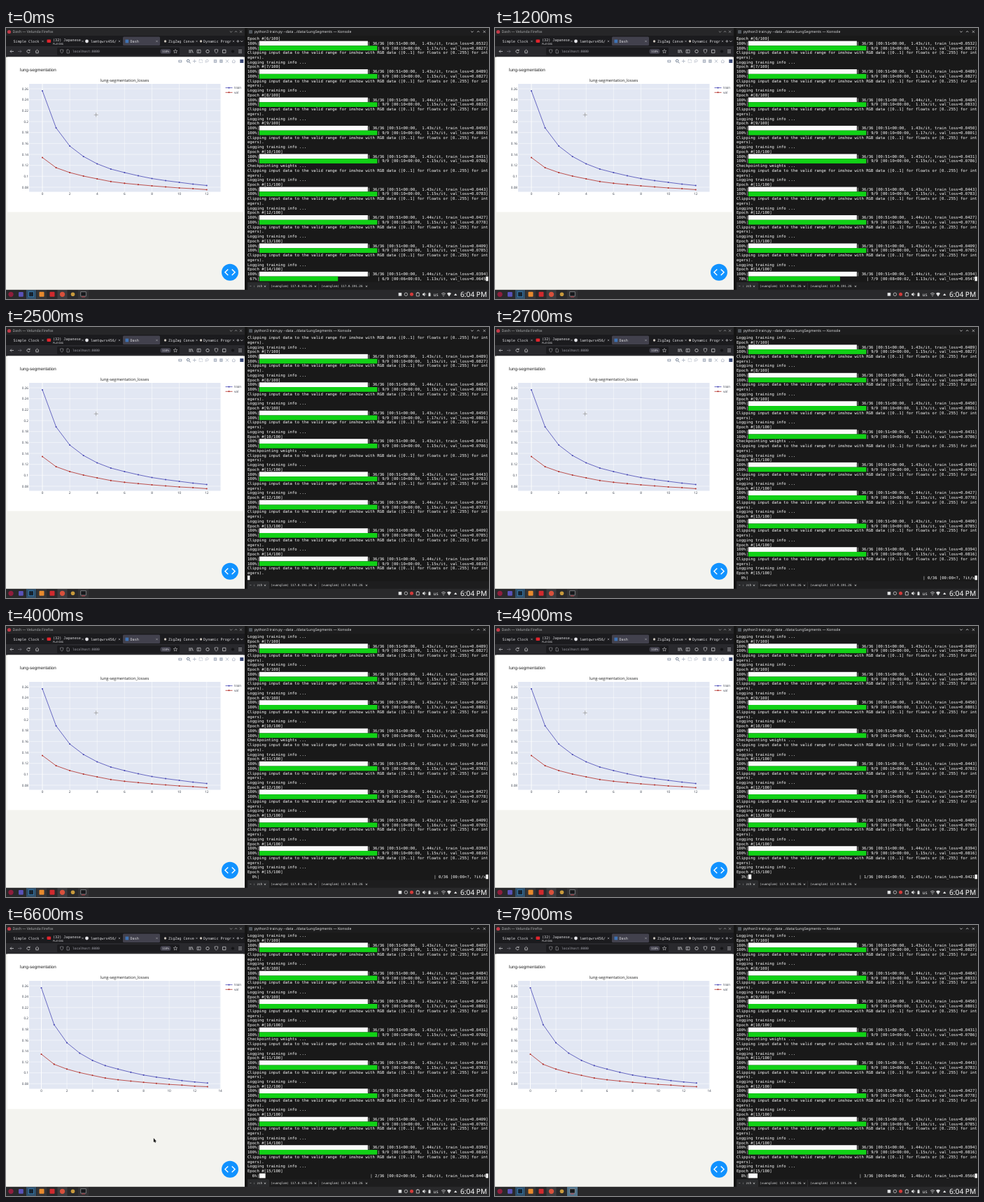
An HTML page for the animation above (8 s loop, 690 by 388 pixels).

```html
<!DOCTYPE html>
<html lang="en">
<head>
<meta charset="utf-8">
<title>Training dashboard</title>
<style>
html, body { margin: 0; width: 100%; height: 100%; overflow: hidden; background: #191919; }
svg { display: block; width: 100%; height: 100%; }
text { text-rendering: geometricPrecision; white-space: pre; }
.mono { font-family: "DejaVu Sans Mono", monospace; }
.ui { font-family: "Noto Sans", sans-serif; }
.plot { font-family: "Open Sans", sans-serif; }
.page { font-family: "Liberation Sans", sans-serif; }
</style>
</head>
<body>
<svg id="stage" viewBox="0 0 690 388">
  <g id="browser"></g>
  <g id="modebar"></g>
  <g id="chart"></g>
  <g id="konsole"></g>
  <g id="term"></g>
  <g id="bar"></g>
  <g id="cross" fill="none">
    <path d="M-3.5 0H3.5M0 -3.5V3.5" stroke="#fff" stroke-width="1.6"/>
    <path d="M-3.2 0H3.2M0 -3.2V3.2" stroke="#8a8d96" stroke-width=".8"/>
  </g>
  <path id="arrow" d="M0 0V5.2L1.2 4.2L2 6L2.9 5.6L2.1 3.9H3.6Z" fill="#111" stroke="#111" stroke-width=".3"/>
</svg>
<script>
const $ = id => document.getElementById(id);
const LOOP = 8000;

const rect = (x, y, w, h, fill, extra = '') =>
  `<rect x="${x}" y="${y}" width="${w}" height="${h}" fill="${fill}" ${extra}/>`;
const dot = (x, y, r, fill) => `<circle cx="${x}" cy="${y}" r="${r}" fill="${fill}"/>`;
const ring = (x, y, r, color, w = 0.7) =>
  `<circle cx="${x}" cy="${y}" r="${r}" fill="none" stroke="${color}" stroke-width="${w}"/>`;
const line = (d, color, w = 0.7) =>
  `<path d="${d}" fill="none" stroke="${color}" stroke-width="${w}"/>`;
const esc = s => s.replace(/&/g, '&amp;').replace(/</g, '&lt;');
const text = (x, y, s, size, fill, cls, extra = '') =>
  `<text class="${cls}" x="${x}" y="${y}" font-size="${size}" fill="${fill}" ${extra}>${esc(s)}</text>`;
const cross = (x, y, r, color) =>
  line(`M${x - r} ${y - r}l${2 * r} ${2 * r}M${x - r} ${y + r}l${2 * r} ${-2 * r}`, color, 0.6);
const chevron = (x, y, dir, color) =>
  line(`M${x - 1.7} ${y - dir * 0.8}l1.7 ${dir * 1.7}l1.7 ${-dir * 1.7}`, color, 0.7);

function windowButtons(x, gap, color) {
  return chevron(x, 5.3, 1, color) + chevron(x + gap, 5.3, -1, color) + cross(x + 2 * gap, 5.3, 1.6, color);
}

// ---- Browser ----
function browser(updating) {
  const ink = '#dcdcdf', dim = '#a4a4aa';
  let s = rect(0, 0, 341, 11, '#262628') + rect(0, 11, 341, 15, '#1b1b1e') + rect(0, 26, 341, 15.5, '#29292d');
  s += dot(4.5, 5.5, 2.6, '#c03a48');
  s += text(9.5, 7.4, updating ? 'Updating...' : 'Dash — Velunda Firefox', 5.2, '#a9abad', 'ui');
  s += windowButtons(321.5, 7, '#a9abad');

  s += rect(167, 12.5, 53, 12.5, '#42414d', 'rx="1.5"');
  const tab = (x, label, y = 20.8) => text(x, y, label, 5.1, ink, 'mono');
  s += tab(10.5, 'Simple Clock');
  s += rect(58.5, 16.4, 5.6, 4.6, '#e0242c', 'rx="1"') + tab(67, '(32) Japanese', 19.4) + text(67, 24, 'PLAYING', 3.5, ink, 'mono');
  s += dot(115.5, 19, 2.4, '#e6e6ea') + tab(121, 'lamtqwrx456/');
  s += rect(170.5, 16.6, 4.6, 4.8, '#3f73b5') + tab(177.5, updating ? 'Updating...' : 'Dash');
  s += dot(227.5, 19, 1.7, '#c9c3ba') + tab(232, 'ZigZag Conve');
  s += dot(278.5, 19, 1.7, '#c9c3ba') + tab(282, 'Dynamic Progr');
  for (const x of [52.5, 109.5, 162, 215.5, 272.5, 325]) s += cross(x, 19, 1.2, dim);
  s += line('M329.3 19h4M331.3 17v4', ink, 0.6) + chevron(336.8, 19, 1, ink);

  s += line('M11 33.5H6M8 31.5l-2 2l2 2', ink) + line('M17 33.5h5M20 31.5l2 2l-2 2', '#77767f');
  s += line('M33.8 32.1a2.2 2.2 0 1 0 .4 2M34.1 30.6v1.8h-1.8', ink);
  s += line('M42 33.5l2.5 -2.3l2.5 2.3M42.8 33v2.8h3.4v-2.8', ink);
  s += rect(73, 28, 175, 11, '#1b1b1e', 'rx="1.5"');
  s += line('M77.5 31.2q1.8 0 2.2 -.5q.4 .5 2.2 .5q0 3.8 -2.2 5q-2.2 -1.2 -2.2 -5z', dim, 0.6);
  s += line('M87 31v5h3.4v-3.8l-1.2 -1.2z', dim, 0.6);
  s += text(95, 35.2, 'localhost:8080', 4.6, '#a9a9b2', 'mono');
  s += rect(220.5, 30, 15, 7, '#42414d', 'rx="3"') + text(228, 35, '110%', 4.2, ink, 'mono', 'text-anchor="middle"');
  s += line('M242 30.6l.8 1.9l2 .1l-1.5 1.3l.5 2l-1.8 -1.1l-1.8 1.1l.5 -2l-1.5 -1.3l2 -.1z', ink, 0.5);
  s += line('M262 31v4.8M264 31v4.8M265.6 31.1l1.6 4.7', ink, 0.8);
  s += line('M273 31.3h5v4.4h-5zM275 31.3v4.4', ink, 0.6);
  s += ring(288, 33.5, 2.2, ink) + line('M298 31q2 0 2.4 -.5q.4 .5 2.4 .5q0 4 -2.4 5.2q-2.4 -1.2 -2.4 -5.2z', ink, 0.6);
  s += line('M309.5 31.3h4.4v4.4h-4.4z', ink, 0.7) + dot(324, 33.5, 2.1, '#141416');
  s += line('M332 31.5h5M332 33.5h5M332 35.5h5', ink, 0.6);

  s += rect(0, 41.5, 341, 333.5, '#f3f3ef') + rect(2, 41.5, 337, 222, '#fff');
  s += text(20, 61.8, 'lung-segmentation', 6.3, '#222', 'page');
  s += dot(320, 349.7, 12, '#1192ff');
  s += line('M317.3 345.5l-4.4 4.3l4.4 4.3M322.7 345.5l4.4 4.3l-4.4 4.3', '#fff', 1.4);
  return s + rect(341, 0, 4, 375, '#141414');
}

function modebar() {
  const g = '#a9b1bf';
  let s = rect(246.3, 45.8, 5, 3.6, g, 'rx=".6"') + dot(248.8, 47.6, 1, '#fff');
  s += line('M262 49l1.4 1.4', '#4d5d77', 0.9) + ring(260.2, 47, 1.8, '#4d5d77', 0.8);
  s += line('M266.8 47.5h5M269.3 45v5', g, 0.8);
  s += `<rect x="276" y="45.4" width="4.4" height="4.2" fill="none" stroke="${g}" stroke-width=".7" stroke-dasharray="1 .6"/>`;
  s += line('M285 49.8q.2 -1 .6 -1.2q-1.7 -1.5 .6 -2.8q2.5 -.9 3.3 .9q0 1.9 -3.8 1.9', g);
  for (const x of [296.8, 305.2]) s += rect(x, 45.3, 4.4, 4.4, g);
  s += line('M297.8 47.5h2.4M299 46.3v2.4M306.2 47.5h2.4', '#fff', 0.6);
  s += line('M314 45.3l4 4.4M318 45.3l-4 4.4', g, 0.8);
  s += line('M322.8 47.7l2.5 -2.2l2.5 2.2M323.6 47.2v2.5h3.4v-2.5', g);
  return s + rect(334.3, 45, 5, 5, '#3c4a78');
}

// ---- Chart ----
const TRAIN = [.2562, .1885, .1553, .1362, .1228, .1132, .1068, .101, .0959, .0921, .0889, .0857, .0832, .0812];
const VAL = [.1343, .1157, .1068, .1004, .0953, .0904, .0872, .0848, .0825, .0806, .0787, .0774, .0755, .0745];

function chart(n) {
  const blue = '#4747b4', red = '#b32e28', ink = '#333a48';
  const x0 = n > 13 ? 50.5 : 52, step = n > 13 ? 18.26 : 19.56;
  const px = i => x0 + i * step;
  const scale = 141.5 / (TRAIN[0] - VAL[n - 1]);
  const py = v => 90 + (TRAIN[0] - v) * scale;
  let s = rect(33, 80, 273.5, 154.5, '#e2e7f3');
  for (let i = 0; i <= n; i += 2) {
    const x = px(i);
    if (x > 307) break;
    s += line(`M${x} 80V234.5`, '#fff', i ? 0.5 : 0.9);
    s += text(x, 239.2, String(i), 4.7, ink, 'plot', 'text-anchor="middle"');
  }
  for (let k = 4; k <= 13; k++) {
    const v = k / 50, y = py(v);
    s += line(`M33 ${y}H306.5`, '#fff', 0.5);
    s += text(32, y + 1.7, String(v), 4.7, ink, 'plot', 'text-anchor="end"');
  }
  for (const [data, color] of [[TRAIN, blue], [VAL, red]]) {
    const pts = data.slice(0, n).map((v, i) => [px(i), py(v)]);
    s += `<polyline points="${pts.join(' ')}" fill="none" stroke="${color}" stroke-width=".8"/>`;
    s += pts.map(p => dot(p[0], p[1], 1.05, color)).join('');
  }
  s += text(169.5, 77.4, 'lung-segmentation_losses', 5.75, '#222', 'plot', 'text-anchor="middle"');
  [['train', blue, 85.6], ['val', red, 92.3]].forEach(([name, color, y]) => {
    s += line(`M313.5 ${y}h10`, color, 0.8) + dot(318.5, y, 1.05, color);
    s += text(326, y + 1.6, name, 4.7, ink, 'plot');
  });
  return s;
}

// ---- Terminal ----
const COLS = 102, ROWS = 52, CW = 3.371, RH = 6.74, TX = 345, TY = 11.9;
const WHITE = '#fcfcfc', GREEN = '#11d116', SHELL = '#191919';

const progress = (done, total, tail, color) => ({ done, total, tail, color });
const trainBar = (done, time, rate, loss) =>
  progress(done, 36, `| ${done}/36 [${time},  ${rate}s/it, train_loss=${loss}]`, WHITE);
const valBar = (done, time, rate, loss) =>
  progress(done, 9, `| ${done}/9 [${time},  ${rate}s/it, val_loss=${loss}]`, GREEN);

// epoch, train rate, train loss, val rate, val loss
const HISTORY = [
  [6, '1.43', '0.0532', '1.17', '0.0827'],
  [7, '1.43', '0.0489', '1.15', '0.0827'],
  [8, '1.44', '0.0484', '1.15', '0.0833'],
  [9, '1.43', '0.0450', '1.17', '0.0801'],
  [10, '1.43', '0.0431', '1.15', '0.0786'],
  [11, '1.43', '0.0443', '1.15', '0.0783'],
  [12, '1.44', '0.0427', '1.15', '0.0778'],
  [13, '1.43', '0.0409', '1.16', '0.0785'],
  [14, '1.44', '0.0394', '1.15', '0.0816']
];
const LOG = [];
for (const [n, tr, tl, vr, vl] of HISTORY) {
  LOG.push(`Epoch #[${n}/100]`, trainBar(36, '00:51<00:00', tr, tl), valBar(9, '00:10<00:00', vr, vl));
  if (n === 10) LOG.push('Checkpointing weights ...');
  LOG.push('Clipping input data to the valid range for imshow with RGB data ([0..1] for floats or [0..255] for int',
    'egers).', 'Logging training info ...');
}
LOG.push('Epoch #[15/100]');

// start time, finished log lines, live last line
const STEPS = [
  [0, 51, valBar(6, '00:06<00:03', '1.13', '0.0645')],
  [200, 51, valBar(7, '00:08<00:02', '1.13', '0.0547')],
  [1300, 51, valBar(8, '00:09<00:01', '1.14', '0.0683')],
  [2400, 54, ''],
  [2700, 56, progress(0, 36, '| 0/36 [00:00<?, ?it/s]', WHITE)],
  [4150, 56, trainBar(1, '00:01<00:50', '1.45', '0.0421')],
  [5600, 56, trainBar(2, '00:02<00:50', '1.48', '0.0444')],
  [7050, 56, trainBar(3, '00:04<00:48', '1.46', '0.0566')]
];

function row(item, i, live) {
  const top = TY + i * RH, base = top + 5.15;
  const put = (col, s) => text(TX + col * CW, base, s, 5.6, '#fff', 'mono');
  const block = col => rect(TX + col * CW, top + 0.2, CW, RH - 0.3, WHITE);
  if (typeof item === 'string') return put(0, item) + (live ? block(0) : '');
  const { done, total, tail, color } = item;
  const start = COLS - tail.length, frac = done / total;
  const head = String(Math.round(frac * 100)).padStart(3) + '%|';
  let s = put(0, head) + put(start, live ? tail.slice(0, -1) : tail);
  if (done) s += rect(TX + 5 * CW, top, (start - 5) * CW * frac, RH, color);
  return s + (live ? block(COLS - 1) : '');
}

function terminal([, count, last]) {
  const lines = LOG.slice(count - ROWS + 1, count);
  return lines.map((l, i) => row(l, i, false)).join('') + row(last, ROWS - 1, true);
}

function konsole() {
  const ink = '#dedfe0';
  let s = rect(345, 0, 345, 11, '#1d1d1e') + rect(345, 11, 345, 353, SHELL) + rect(345, 364, 345, 11, '#1d1d1e');
  s += rect(347, 3, 5, 5, '#50565c', 'rx=".8"') + text(355, 7.4, 'python3 train.py --data ../data/LungSegments — Konsole', 5.2, ink, 'ui');
  s += windowButtons(666, 8.7, '#f2f2f2');
  s += rect(345, 364, 30, 11, '#2a2b2d');
  s += text(348, 371.4, '~ : zsh', 4.35, ink, 'mono');
  for (const x of [378, 450]) s += text(x, 371.4, '(vuonglam) 117.0.191.26', 4.3, ink, 'mono');
  for (const x of [370, 442, 515]) s += cross(x, 369.8, 1.2, ink);
  return s + line('M375.5 365v10M446.5 365v10', '#3a3a3c', 0.6);
}

// ---- Task bar ----
function taskbar(hover) {
  const c = '#e2e3e4';
  let s = rect(0, 374.8, 690, 13.2, '#29292b');
  s += rect(29, 375, 14, 13, '#31506a') + rect(44, 375, 14, 13, '#343436') + rect(73.5, 375, 14, 13, '#3c3c3f');
  s += rect(103, 375, 15, 13, hover ? '#51748c' : '#323234');
  s += dot(7, 381.3, 3.6, '#8f1e3c') + rect(18, 378, 6.8, 6.8, '#5a52b8', 'rx="1"');
  s += rect(32.5, 377.8, 7, 7, '#16222e', 'stroke="#3c9be0" stroke-width=".6"') + rect(47.5, 377.7, 7, 7, '#e88a2e', 'rx="1"');
  s += rect(62.5, 377.8, 7, 7, '#d02a2e', 'rx="1"') + dot(80.5, 381.3, 3.6, '#d8503c') + dot(95.5, 381.3, 2.8, '#c89a3c');
  s += rect(106.8, 377.8, 7.4, 6.2, '#17191c', 'stroke="#a9adb1" stroke-width=".6"') + rect(108, 384.5, 5, 0.9, '#c8404a');
  s += rect(560.7, 379.1, 4.5, 4.5, c) + ring(571.4, 381.3, 2.2, c);
  s += dot(579.5, 381.3, 2.5, '#d23a3a');
  s += line('M586.3 379.3h4v4.6h-4zM587.4 378.6h1.8', c);
  s += `<path d="M595 380.3h1.3l1.9 -1.7v5.6l-1.9 -1.7h-1.3z" fill="${c}"/>` + line('M599.2 380q1 1.4 0 2.7', c, 0.6);
  s += rect(603.5, 379.6, 3, 4.5, c) + rect(604.3, 378.7, 1.4, 1, c);
  s += text(610.5, 383.5, 'us', 6.4, c, 'ui');
  s += line('M622 380.5q3 -2.6 6 0M623.2 382q1.8 -1.5 3.6 0', c) + dot(625, 383.6, 0.7, c);
  s += `<path d="M630 380q3 -2.6 6 0l-3 4.4z" fill="${c}"/><path d="M640 383l2.2 -3l2.2 3z" fill="${c}"/>`;
  return s + text(649, 385, '6:04 PM', 10.2, '#fff', 'ui');
}

// ---- Timeline ----
// time, pointer x, pointer y
const PATH = [
  [5400, 128.7, 124.3], [5700, 152.3, 141.6], [6500, 211, 305.5], [6750, 211, 305.5], [7450, 110, 381]
];
const ease = u => u * u * (3 - 2 * u);
function pointer(t) {
  const k = PATH.findIndex(p => t < p[0]);
  if (k === 0) return PATH[0].slice(1);
  if (k < 0) return PATH[PATH.length - 1].slice(1);
  const [t0, x0, y0] = PATH[k - 1], [t1, x1, y1] = PATH[k];
  const u = ease((t - t0) / (t1 - t0));
  return [x0 + (x1 - x0) * u, y0 + (y1 - y0) * u];
}
const visible = (el, on) => el.setAttribute('visibility', on ? 'visible' : 'hidden');
function place(el, [x, y], on) {
  el.setAttribute('transform', `translate(${x} ${y})`);
  visible(el, on);
}
const cache = {};
function show(id, key, build) {
  if (cache[id] === key) return;
  cache[id] = key;
  $(id).innerHTML = build(key);
}

function draw(t) {
  show('browser', t >= 5700 && t < 5950, browser);
  show('chart', t < 5950 ? 13 : 14, chart);
  show('term', STEPS.filter(s => s[0] <= t).pop(), terminal);
  show('bar', t >= 7400, taskbar);
  const at = pointer(t), onPlot = at[1] < 234.5;
  visible($('modebar'), at[1] < 263);
  place($('cross'), at, onPlot);
  place($('arrow'), at, !onPlot && t < 7500);
}

$('modebar').innerHTML = modebar();
$('konsole').innerHTML = konsole();
const begin = performance.now();
function tick() {
  draw((performance.now() - begin) % LOOP);
  requestAnimationFrame(tick);
}
tick();
</script>
</body>
</html>
```
